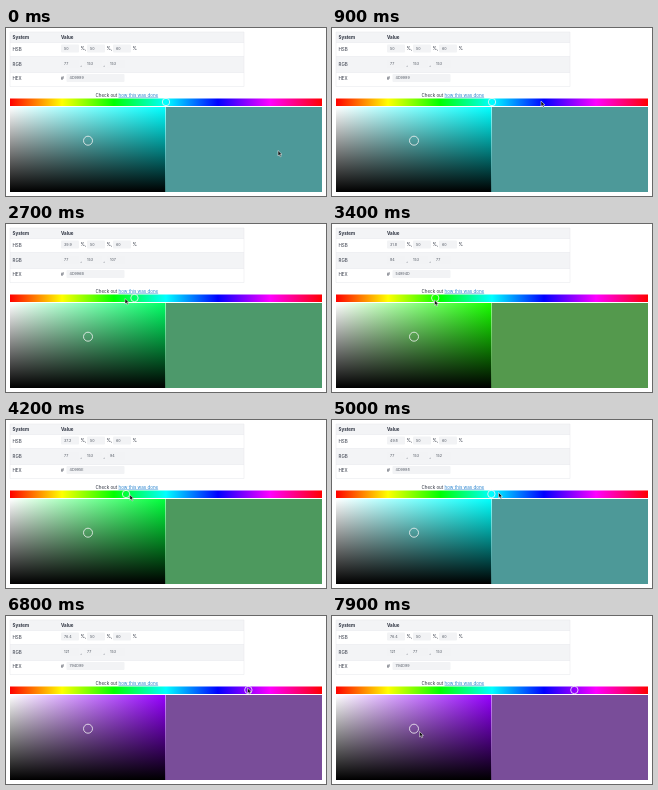
Recreate the animation shown at these times as an HTML page. Size 320 px wide and 168 px high, loop 8 s.

```html
<!DOCTYPE html>
<html lang="en">
<head>
<meta charset="utf-8">
<title>Colour picker</title>
<style>
html, body { margin: 0; width: 100%; height: 100%; overflow: hidden; background: #fff; }
svg { display: block; width: 100vw; height: 100vh; }
text { font: 4.5px Inter, "Open Sans", sans-serif; fill: #2d3340; white-space: pre; }
.head { font-weight: 700; }
.val { font-size: 3.7px; fill: #555b66; }
.link { fill: #2b86d0; text-decoration: underline; }
.ring { fill: none; stroke: #f4f4f4; stroke-opacity: .8; }
</style>
</head>
<body>
<svg viewBox="0 0 320 168">
  <defs>
    <linearGradient id="rainbow"></linearGradient>
    <linearGradient id="tint">
      <stop stop-color="#fff"/><stop id="pure" offset="1"/>
    </linearGradient>
    <linearGradient id="shade" x2="0" y2="1">
      <stop stop-opacity="0"/><stop offset="1"/>
    </linearGradient>
  </defs>

  <rect x="4" y="4" width="234" height="10.5" fill="#f3f4f6"/>
  <rect x="4" y="28.5" width="234" height="16" fill="#f3f4f6"/>
  <path d="M4 14.5H238M4 28.5H238M4 44.5H238M4 4H238V58.5H4Z" fill="none" stroke="#e4e6ea" stroke-width=".5"/>
  <g id="table"></g>
  <text x="89.5" y="68.6">Check out <tspan class="link">how this was done</tspan></text>

  <rect x="4" y="70.5" width="312" height="7.5" fill="url(#rainbow)"/>
  <rect x="4" y="79" width="155.5" height="85" fill="url(#tint)"/>
  <rect x="4" y="79" width="155.5" height="85" fill="url(#shade)"/>
  <rect id="swatch" x="160" y="79" width="156" height="85"/>
  <circle class="ring" cx="82" cy="112.7" r="4.5"/>
  <circle class="ring" id="knob" cy="74" r="3.7"/>
  <path id="cursor" d="M0 0V5.4L1.3 4.3L2.2 6.3L3.2 5.8L2.3 3.9H4Z" fill="#111" stroke="#fff" stroke-width=".5"/>
</svg>
<script>
const $ = id => document.getElementById(id);
const LOOP = 8000, STEP = 100, LEFT = 4, WIDTH = 312;

function add(parent, tag, attrs, text = "") {
  const el = document.createElementNS("http://www.w3.org/2000/svg", tag);
  for (const k in attrs) el.setAttribute(k, attrs[k]);
  el.textContent = text;
  return parent.appendChild(el);
}
const table = $("table");
const label = (x, y, s, cls = "") => add(table, "text", { x, y, class: cls }, s);
function field(x, y, w) {
  add(table, "rect", { x, y: y - 5.4, width: w, height: 8, rx: 1, fill: "#f2f3f5" });
  return label(x + 3, y, "", "val");
}

label(6.5, 11, "System", "head");
label(55, 11, "Value", "head");
label(6.5, 23.3, "HSB");
label(6.5, 38.4, "RGB");
label(6.5, 51.9, "HEX");
const hsb = [55, 81, 107].map(x => field(x, 21.9, 18));
["%,", "%,", "%"].forEach((s, i) => label(74.5 + 26 * i, 22.2, s));
const rgb = [55, 78, 101].map(x => field(x, 37.4, 18));
[74.5, 97.5].forEach(x => label(x, 37.8, ","));
label(55, 51.6, "#");
const hex = field(60.5, 51.4, 58);
hsb[1].textContent = 50;
hsb[2].textContent = 60;

for (let i = 0; i <= 6; i++)
  add($("rainbow"), "stop", { offset: i / 6, "stop-color": `hsl(${i * 60} 100% 50%)` });

// [time, value] tracks
const cursorX = [[0, 272], [300, 268], [900, 209], [1600, 157], [1800, 157], [2000, 151],
  [3300, 102.5], [3450, 102.5], [5000, 166.5], [5700, 208.5], [6800, 241.5], [6950, 241.5],
  [7800, 88], [7900, 87.5]];
const cursorY = [[0, 122.5], [300, 120], [900, 73], [1600, 73], [2000, 73], [3400, 76],
  [5000, 72.5], [5700, 71], [6800, 72], [6950, 72], [7800, 115], [7900, 115.5]];
const hue = [[0, 50], [1750, 50], [2000, 49.7], [3350, 31.8], [3500, 31.8],
  [5000, 49.8], [5700, 64.4], [6800, 76.4], [8000, 76.4]];

const slope = (a, b) => a && b ? (b[1] - a[1]) / (b[0] - a[0]) : 0;

// Cubic interpolation that never overshoots its points
function at(track, t) {
  const i = track.findIndex(p => p[0] > t);
  if (i < 0) return track.at(-1)[1];
  const tangent = j => {
    const s = slope(track[j - 1], track[j]), u = slope(track[j], track[j + 1]);
    return s * u > 0 ? 2 * s * u / (s + u) : 0;
  };
  const a = track[i - 1], b = track[i], d = b[0] - a[0], p = (t - a[0]) / d, q = 1 - p;
  return a[1] * q * q * (1 + 2 * p) + b[1] * p * p * (1 + 2 * q)
    + d * p * q * (tangent(i - 1) * q - tangent(i) * p);
}

function toRgb(h, s, v) {
  return [5, 3, 1].map(n => {
    const k = (n + h / 60) % 6;
    return Math.round(255 * v * (1 - s * Math.max(0, Math.min(k, 4 - k, 1))));
  });
}

function draw(now) {
  const t = Math.floor(now % LOOP / STEP) * STEP;
  const h = Math.round(at(hue, t) * 10) / 10;
  const color = toRgb(h * 3.6, .5, .6);
  hsb[0].textContent = h;
  color.forEach((c, i) => rgb[i].textContent = c);
  hex.textContent = color.map(c => c.toString(16).padStart(2, "0")).join("").toUpperCase();
  $("swatch").setAttribute("fill", `rgb(${color})`);
  $("pure").setAttribute("stop-color", `hsl(${h * 3.6} 100% 50%)`);
  $("knob").setAttribute("cx", LEFT + WIDTH * h / 100);
  $("cursor").setAttribute("transform", `translate(${at(cursorX, t)} ${at(cursorY, t)})`);
}

const start = performance.now();
function tick() {
  draw(performance.now() - start);
  requestAnimationFrame(tick);
}
tick();
</script>
</body>
</html>
```
